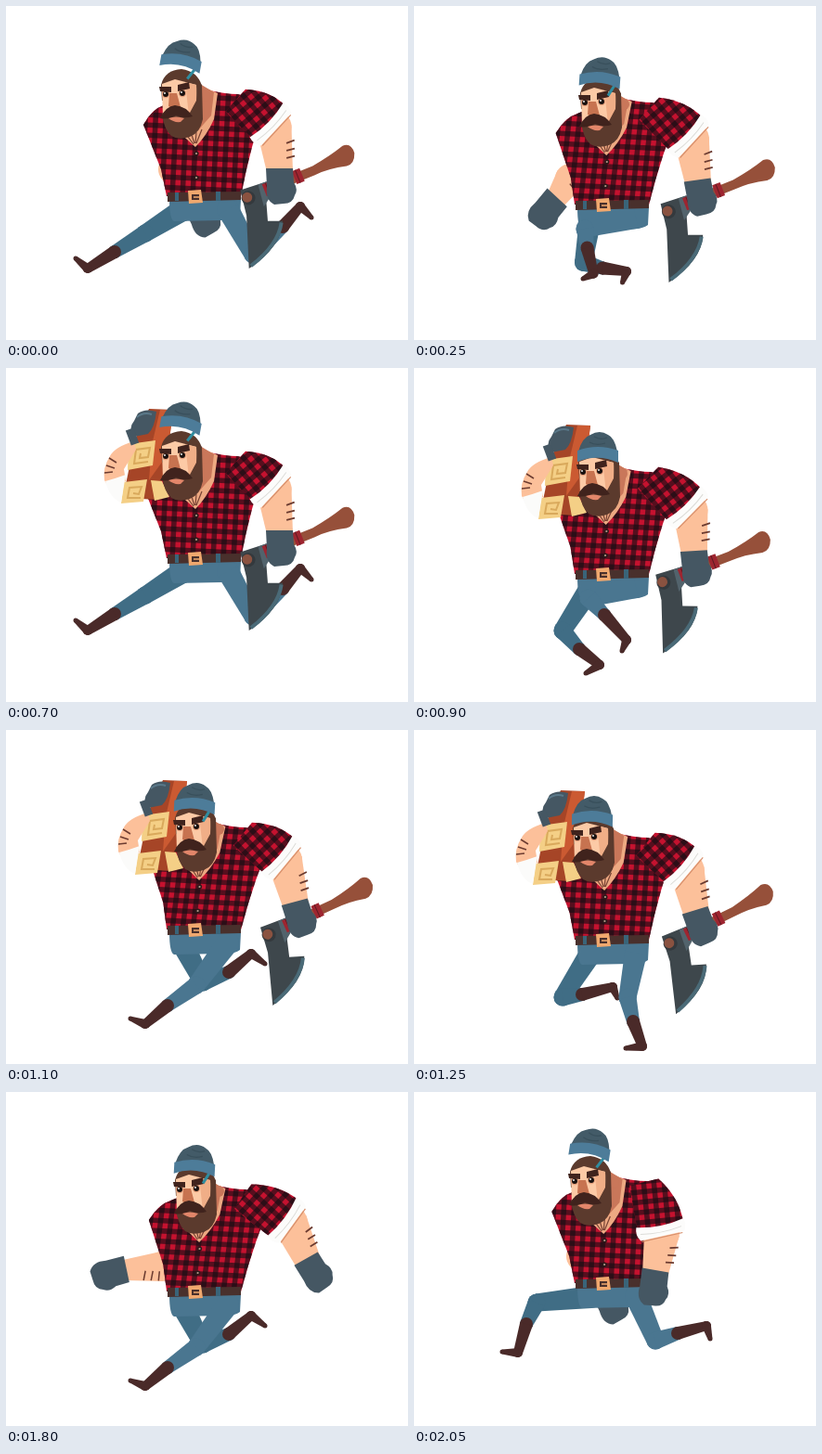
Animation, 433 px wide and 360 px high, one loop 2.1 s. Source, as an HTML page with a canvas:

```html
<!DOCTYPE html>
<html lang="en">
<head>
<meta charset="utf-8">
<title>Running lumberjack</title>
<style>
html, body { margin: 0; width: 100%; height: 100%; overflow: hidden; background: #fff; }
canvas { display: block; }
</style>
</head>
<body>
<canvas id="stage" width="433" height="360"></canvas>
<script>
const ctx = document.getElementById('stage').getContext('2d');
const STEP = 50, STRIDE = 14, STRIDES = 3;
const SKIN = '#fcc09a', HAIR = '#5b3a2d', GLOVE = '#455763', BOOT = '#4a2a29',
  DENIM = '#4a7690', FAR_DENIM = '#406d85', TAN = '#f4cf86', INK = '#2a1a1a';

// Tracks: step within the stride -> values, linear between, cyclic.
// Belt height, lean of the upper body, lift of the hat
const body = {
  0: [206, 0, 16], 1: [219, 0, 7], 3: [238, 7, 0], 4: [223, 10, 0], 6: [207, 14, 12],
  7: [206, 15, 13], 8: [216, 15, 5], 10: [238, 8, 0], 11: [227, 4, 2], 13: [207, 1, 14]
};
// Knee, ankle, heel, toe
const farLeg = {
  0: [150, 245, 117, 265, 88, 283, 75, 272], 1: [163, 266, 129, 293, 106, 311, 91, 299],
  3: [165, 295, 160, 314, 158, 341, 137, 344], 4: [160, 283, 178, 303, 200, 320, 185, 329],
  6: [205, 270, 228, 262, 258, 252, 264, 267], 7: [212, 272, 238, 247, 262, 228, 275, 238],
  8: [212, 272, 240, 261, 264, 241, 279, 252], 10: [182, 302, 207, 298, 233, 281, 240, 290],
  11: [160, 288, 181, 285, 214, 277, 219, 289], 13: [132, 227, 121, 250, 112, 281, 95, 280]
};
const nearLeg = {
  0: [266, 268, 298, 238, 317, 216, 329, 228], 1: [263, 276, 280, 261, 300, 238, 314, 249],
  3: [227, 300, 250, 296, 275, 281, 282, 291], 4: [188, 248, 205, 266, 229, 293, 224, 305],
  6: [180, 232, 168, 255, 158, 284, 140, 283], 7: [200, 250, 165, 275, 136, 296, 121, 282],
  8: [205, 275, 174, 297, 150, 317, 134, 311], 10: [213, 290, 196, 312, 190, 341, 171, 344],
  11: [230, 288, 236, 314, 246, 341, 228, 343], 13: [260, 268, 284, 260, 315, 252, 319, 266]
};
// Cuff, wrist, palm (heights from the belt), angle of the axe
const axeArm = {
  0: [285, -79, 295, -28, 295, -14, -22], 4: [294, -73, 302, -23, 303, -6, -21],
  7: [298, -79, 314, -28, 319, -12, -23], 10: [293, -78, 308, -28, 311, -11, -28],
  11: [290, -79, 304, -30, 309, -14, -26]
};
const freeArm = {
  0: [261, -58, 248, -15, 241, 2, 0], 1: [258, -55, 238, -19, 227, 0, 0],
  4: [275, -65, 275, -15, 277, 3, 0], 6: [300, -76, 330, -36, 342, -20, 0],
  8: [302, -78, 325, -34, 335, -16, 0], 10: [293, -75, 308, -28, 315, -10, 0],
  13: [266, -60, 260, -12, 257, 5, 0]
};
// Elbow, wrist, palm (heights from the belt)
const farArm = {
  0: [180, -30, 206, 8, 212, 22], 1: [180, -30, 206, 8, 212, 23], 4: [168, -30, 170, 2, 163, 20],
  6: [168, -28, 135, -14, 118, -6], 8: [168, -28, 127, -24, 108, -20],
  10: [168, -30, 168, 2, 158, 19], 13: [180, -30, 206, 8, 212, 22]
};

function at(track, i) {
  const keys = Object.keys(track).map(Number);
  const a = keys.filter(k => k <= i).pop();
  const b = keys.find(k => k > i) ?? STRIDE;
  const u = (i - a) / (b - a);
  return track[a].map((v, j) => v + (track[b % STRIDE][j] - v) * u);
}

const shape = (d, color) => { ctx.fillStyle = color; ctx.fill(new Path2D(d)); };

function line(d, color, width = 1.5) {
  ctx.strokeStyle = color;
  ctx.lineWidth = width;
  ctx.stroke(new Path2D(d));
}

function dot(x, y, r, color) {
  ctx.fillStyle = color;
  ctx.beginPath();
  ctx.arc(x, y, r, 0, 7);
  ctx.fill();
}

function within(x, y, angle, draw) {
  ctx.save();
  ctx.translate(x, y);
  ctx.rotate(angle);
  draw();
  ctx.restore();
}

// Tapered limb with round ends
function limb(x1, y1, x2, y2, r1, r2, color) {
  const a = Math.atan2(y2 - y1, x2 - x1), s = Math.sin(a), c = Math.cos(a);
  dot(x1, y1, r1, color);
  dot(x2, y2, r2, color);
  shape(`M${x1 - s * r1},${y1 + c * r1}L${x2 - s * r2},${y2 + c * r2}
    L${x2 + s * r2},${y2 - c * r2}L${x1 + s * r1},${y1 - c * r1}Z`, color);
}

function plaid(d, angle) {
  ctx.save();
  shape(d, '#c5122f');
  ctx.clip(new Path2D(d));
  ctx.rotate(angle);
  ctx.fillStyle = 'rgba(18,14,20,.62)';
  for (let i = -440; i < 440; i += 11) {
    ctx.fillRect(i, -440, 5.5, 880);
    ctx.fillRect(-440, i, 880, 5.5);
  }
  ctx.restore();
}

function leg(hipX, hipY, [kx, ky, ax, ay, hx, hy, tx, ty], color) {
  limb(hipX, hipY, kx, ky, 12, 9.5, color);
  limb(kx, ky, ax, ay, 9.5, 7, color);
  limb(ax, ay, hx, hy, 7, 5, BOOT);
  limb(hx, hy, tx, ty, 5, 2.5, BOOT);
}

function glove(wx, wy, gx, gy) {
  within(wx, wy, Math.atan2(gy - wy, gx - wx), () =>
    shape('M-3,-14L12,-15Q20,-20 26,-16Q35,-14 35,-4L36,6Q31,16 17,14L-3,15Z', GLOVE));
}

function drawFarArm([ex, ey, wx, wy, gx, gy]) {
  limb(160, -55, ex - 4, ey, 11, 15, '#fff');
  limb(ex, ey, wx, wy, 16, 11, SKIN);
  within(wx, wy, Math.atan2(ey - wy, ex - wx), () =>
    line('M20,13l3,-10M28,14l3,-10M36,15l2,-10', '#6b3b30'));
  glove(wx, wy, gx, gy);
}

function drawTorso() {
  plaid('M173,-1L167,-30L148,-78Q157,-95 170,-99L212,-117Q234,-111 250,-111Q267,-107 276,-92L265,-54Q258,-28 253,-1Z', 0.05);
  shape('M205,-122L228,-112L224,-84Q216,-66 204,-54Q193,-64 186,-70Z', '#eda982');
  shape('M209,-122L224,-113L221,-88L207,-72Z', '#c9775a');
  line('M193,-69l9,12M199,-70l4,12M205,-70l-1,12M211,-73l-6,15', '#774334', 1.2);
  for (const y of [-47, -21]) {
    dot(205, y, 2.6, INK);
    dot(205, y, 1.1, '#b89a8c');
  }
}

function drawBelt() {
  shape('M174,-5L253,-6L253,3L174,5Z', '#49302c');
  shape('M182,-5h4v9h-4zM226,-6h5v10h-5z', '#3a6479');
  shape('M196,-7L210,-8L212,6L197,7Z', '#f0a86e');
  shape('M200,-3h8v6h-8z', '#49302c');
  line('M202,0h7', '#f0a86e');
}

function drawLog() {
  shape('M164,61L190,62L185,102L174,159L136,157L149,94Z', '#a64527');
  shape('M176,62L190,62L184,110L164,138L167,100Z', '#cb5a32');
  shape('M142,99L171,95L168,122L141,127Z', TAN);
  shape('M137,140L162,137L158,161L134,163Z', TAN);
  shape('M166,138L178,139L186,156L170,160Z', TAN);
  line('M163,118L148,120L150,105L165,103L163,113L154,114L155,109', '#d9a95c', 2);
  line('M155,157L141,157L143,146L156,145L153,153L147,152', '#d9a95c', 2);
  shape('M148,96Q127,102 122,112Q114,124 116,138L122,148L139,139L137,126L150,105Z', SKIN);
  shape('M117,139Q128,136 139,132L134,162Q122,158 117,139Z', '#fbfbfa');
  line('M121,114l8,5M118,122l9,3M116,130l9,-1', '#6b3b30');
  shape('M152,66Q160,60 172,64Q170,82 163,88L148,91Q141,82 148,74Z', GLOVE);
  line('M143,83L149,99', GLOVE, 9);
  line('M151,70Q158,64 167,67', '#5a7889', 2);
}

function drawHead() {
  dot(214, -109, 6, '#c9775a');
  shape('M167,-121Q171,-137 189,-138Q206,-136 211,-120L211,-105L168,-104Z', HAIR);
  shape('M168,-122L182,-127L205,-121L206,-96L196,-80L169,-84Z', '#fccaa6');
  shape('M193,-124L205,-121L206,-96L197,-88Z', '#f0ae87');
  shape('M206,-124L211,-121L212,-84Q209,-69 198,-65Q186,-61 178,-66Q170,-73 168,-90L183,-92L198,-91L205,-104Z', HAIR);
  shape('M176,-112L184,-112L188,-97Q181,-94 175,-98Z', '#c77350');
  shape('M166,-85Q172,-98 182,-99Q194,-98 201,-87Q192,-84 183,-88Q175,-83 166,-85Z', '#40231d');
  shape('M175,-85Q183,-88 192,-85L188,-81Q181,-80 175,-85Z', '#e2866a');
  for (const [x, y] of [[172, -111], [190, -112]]) {
    dot(x, y, 4.2, '#e7a17d');
    dot(x, y, 3, '#18100f');
    dot(x - 1, y - 1, 0.9, '#fff');
  }
  shape('M165,-119L178,-119L178,-113L166,-114Z', '#40231d');
  shape('M185,-121L197,-124L198,-117L185,-114Z', '#40231d');
}

function drawHat(lift) {
  within(188, -128 - lift, lift * 0.011, () => {
    if (lift > 3) line('M16,4L10,15', '#2f8da0', 3);
    shape('M-21,-5Q-17,-20 -8,-23Q2,-29 11,-23Q18,-20 21,-5Z', '#435b68');
    line('M-4,-21Q3,-17 10,-20M-9,-15Q-2,-11 8,-14', '#39505c', 1.3);
    shape('M-22,-6Q0,-14 22,-6L22,7Q0,-3 -22,6Z', '#4d7c99');
  });
}

function drawAxe(x, y, angle) {
  within(x, y, angle * Math.PI / 180, () => {
    shape('M-42,-10L-13,-8L-20,10L-27,32L-12,38Q-23,63 -65,72L-46,18Z', '#3e474c');
    line('M-14,39Q-26,60 -62,70', '#4a6a77', 4);
    shape('M-22,-8L-12,-8L-15,9L-25,16Z', '#52636c');
    dot(-37, 1, 7.5, '#34393d');
    dot(-38, 0, 5.5, '#8a5240');
    shape('M-14,-5L40,-5Q62,-8 78,-13Q88,-13 87,-1Q83,10 74,9Q55,4 38,5L-14,5Z', '#96503a');
    shape('M-18,-7h9v14h-9zM17,-8h9v15h-9z', '#9e2530');
    line('M-14,-7v14M21,-8v15', '#5f1a22', 1);
  });
}

function drawNearArm([cx, cy, wx, wy, gx, gy, tilt], shoulderX, hasAxe) {
  const sy = -107, out = Math.atan2(cy - sy, cx - shoulderX), reach = Math.hypot(cx - shoulderX, cy - sy);
  const fx = cx + 5 * Math.cos(out), fy = cy + 5 * Math.sin(out);
  limb(fx, fy, wx, wy, 19, 14, SKIN);
  within(wx, wy, Math.atan2(fy - wy, fx - wx), () =>
    line('M13,9l1,9M21,10l1,9M29,11l2,9', '#6b3b30', 1.8));
  within(cx, cy, out, () => {
    plaid(`M${-reach - 5},-8Q${-reach * 0.6},-26 -2,-25L-2,25Q${-reach * 0.6},25 ${-reach - 4},24Z`, 0.1);
    shape('M-6,-26Q2,-28 8,-24L9,24Q2,29 -6,26Q0,0 -6,-26Z', '#fcfcfb');
    line('M2,-22Q6,0 2,23', '#dcdcd8', 1);
    line('M9,-22L10,23', '#d78f6c', 1.2);
  });
  if (hasAxe) drawAxe(gx, gy, tilt);
  glove(wx, wy, gx, gy);
}

function draw(step) {
  const i = step % STRIDE, stride = Math.floor(step / STRIDE);
  const hasAxe = stride < 2, hasLog = stride === 1;
  const [belt, lean, lift] = at(body, i);

  ctx.fillStyle = '#fff';
  ctx.fillRect(0, 0, 433, 360);
  ctx.save();
  ctx.translate(0, belt);
  if (!hasLog) drawFarArm(at(farArm, i));
  ctx.restore();

  leg(190, belt + 14, at(farLeg, i), FAR_DENIM);
  within(0, belt, 0, () => shape('M176,2L253,2L252,21Q246,26 232,25L181,26Q176,24 176,2Z', DENIM));
  leg(239, belt + 13, at(nearLeg, i), DENIM);

  ctx.save();
  ctx.translate(0, belt);
  ctx.save();
  ctx.transform(1, 0, -lean * 0.55 / 110, 1, 0, 0);
  drawTorso();
  ctx.restore();
  drawBelt();
  if (hasLog) within(lean - 10, -223, 0, drawLog);
  within(lean, 0, 0, () => { drawHead(); drawHat(lift); });
  drawNearArm(at(hasAxe ? axeArm : freeArm, i), 256 + lean * 0.5, hasAxe);
  ctx.restore();
}

const start = performance.now();
function tick() {
  draw(Math.floor((performance.now() - start) / STEP) % (STRIDE * STRIDES));
  requestAnimationFrame(tick);
}
tick();
</script>
</body>
</html>
```
